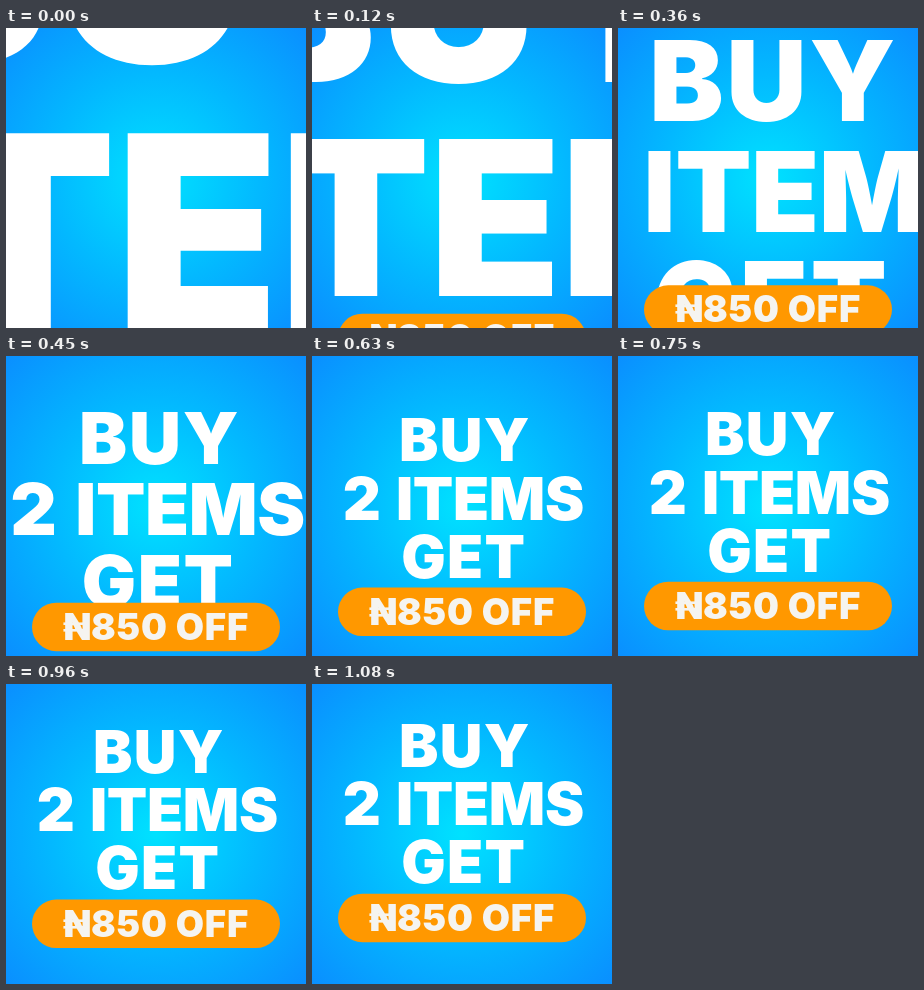
An HTML page that plays this animation: 300x300 px, repeating every 1.85 s.

```html
<!DOCTYPE html>
<html lang="en">
<head>
<meta charset="utf-8">
<title>Offer</title>
<style>
  html, body { margin: 0; width: 100%; height: 100%; overflow: hidden; }
  svg { display: block; width: 100vw; height: 100vh; }
  text { font-family: Inter, "Open Sans", sans-serif; font-weight: 900; text-anchor: middle; }
  #headline { font-size: 59px; fill: #fff; letter-spacing: 1.4px; }
  #headline .items { letter-spacing: -0.3px; word-spacing: 4px; }
  #pill text { font-size: 36.5px; letter-spacing: 0.8px; fill: #f5f4f0; }
</style>
</head>
<body>
<svg viewBox="0 0 300 300">
  <defs>
    <radialGradient id="sky" gradientUnits="userSpaceOnUse" cx="150" cy="150" r="212">
      <stop offset="0" stop-color="#00e2ff"/>
      <stop offset="0.5" stop-color="#03b8ff"/>
      <stop offset="1" stop-color="#0a8fff"/>
    </radialGradient>
  </defs>
  <rect width="300" height="300" fill="url(#sky)"/>
  <g id="headline">
    <text x="3" y="-22">BUY</text>
    <text x="1.3" y="36.4" class="items">2 ITEMS</text>
    <text x="1.8" y="94.9">GET</text>
  </g>
  <g id="pill">
    <rect x="26" width="248" height="48.5" rx="24.25" fill="#ff9800"/>
    <text x="150" y="37">₦850 OFF</text>
  </g>
</svg>
<script>
  const LOOP = 1850, STEP = 30;
  const headline = document.getElementById("headline");
  const pill = document.getElementById("pill");

  // Linear move from a to b between two times, held outside them.
  const ramp = (t, start, end, a, b) =>
    a + (b - a) * Math.min(1, Math.max(0, (t - start) / (end - start)));

  function draw(time) {
    const t = Math.floor((time % LOOP) / STEP) * STEP;
    const scale = ramp(t, 0, 480, 4.55, 1);
    const textY = ramp(t, 480, 1080, 135, 104.5);
    const pillY = t < 540 ? ramp(t, 0, 540, 300, 236) : ramp(t, 540, 1080, 236, 209.7);
    headline.setAttribute("transform", `translate(150 ${textY}) scale(${scale})`);
    pill.setAttribute("transform", `translate(0 ${pillY})`);
  }

  const begin = performance.now();
  function tick() {
    draw(performance.now() - begin);
    requestAnimationFrame(tick);
  }
  draw(0);
  requestAnimationFrame(tick);
</script>
</body>
</html>
```
